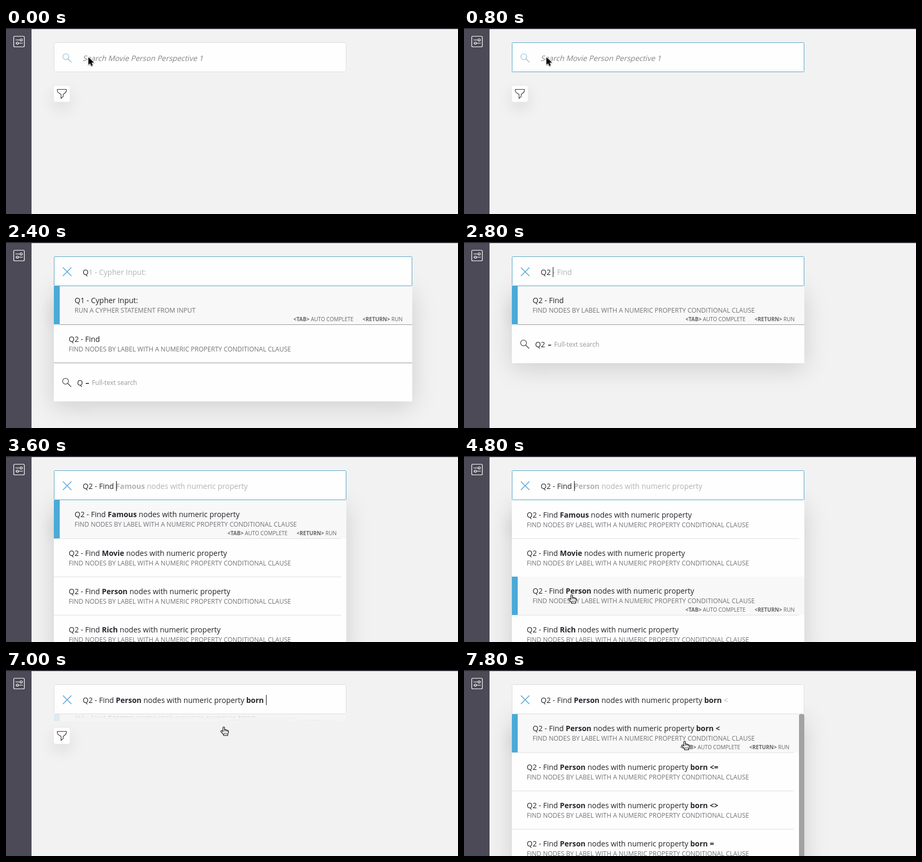
Animation, 850 px wide and 350 px high, one loop 8000 ms. Source, as an HTML page with a canvas:

```html
<!DOCTYPE html>
<html lang="en">
<head>
<meta charset="utf-8">
<title>Search suggestions</title>
<style>
  html, body { margin: 0; width: 100%; height: 100%; overflow: hidden; background: #f2f2f2; }
  canvas { display: block; }
</style>
</head>
<body>
<canvas id="stage" width="850" height="350"></canvas>
<script>
const ctx = document.getElementById('stage').getContext('2d');
const LOOP = 8000, TICK = 200;
const LEFT = 90, TOP = 83, ROW = 72;
const BLUE = '#49aad8', INK = '#25252c', GHOST = '#b3b3b6', PAPER = '#fefefe';
const FIND_HINT = 'FIND NODES BY LABEL WITH A NUMERIC PROPERTY CONDITIONAL CLAUSE';

const find = label => `Q2 - Find *${label}* nodes with numeric property`;
const labels = ['Famous', 'Movie', 'Person', 'Rich'];
const signs = ['<', '<=', '<>', '='];
const born = 'Q2 - Find *Person* nodes with numeric property *born';

const startRows = ['Q1 - Cypher Input:', 'Q2 - Find'];
const labelRows = labels.map(find);
const bornRows = [born + '*'];
const signRows = signs.map(s => `${born} ${s}*`);

// Each step changes only the values it names; the rest carry over.
const steps = [
  { t: 0, text: '', ghost: '', width: 550, focus: false, rows: [], open: 0, full: '', scroll: false },
  { t: 200, focus: true },
  { t: 1400, text: 'Q', ghost: '1 - Cypher Input:', width: 674 },
  { t: 1800, rows: startRows, full: 'Q', open: 0.093 },
  { t: 2000, open: 1 },
  { t: 2600, text: 'Q2 ', ghost: '- Find', width: 550, rows: ['Q2 - Find'], full: 'Q2', open: 0.3 },
  { t: 2800, open: 1 },
  { t: 3200, text: 'Q2 - Find ', ghost: 'label', rows: labelRows, full: '', open: 0.1 },
  { t: 3400, open: 1 },
  { t: 5000, text: 'Q2 - Find *Person* nodes with numeric property ', ghost: '*born*', focus: false, rows: bornRows, open: 0.18 },
  { t: 5200, open: 1 },
  { t: 6800, text: born + '* ', ghost: '', open: 0.5 },
  { t: 7000, open: 0.18 },
  { t: 7200, ghost: '<', rows: signRows, open: 0.25 },
  { t: 7400, open: 1, scroll: true }
];

// Pointer tip positions: time, x, y
const path = [
  [0, 155, 55], [3800, 155, 55], [4600, 201, 261], [6000, 201, 261],
  [6600, 408, 107], [7200, 408, 107], [7600, 413.5, 134], [8000, 413.5, 134]
];

function stateAt(t) {
  const s = { typed: 0 };
  for (const step of steps) {
    if (step.t > t) break;
    if ('text' in step) s.typed = step.t;
    Object.assign(s, step);
  }
  return s;
}

function pointerAt(t) {
  const i = path.findIndex(p => p[0] > t);
  const [t0, x0, y0] = path[i - 1], [t1, x1, y1] = path[i];
  const k = (t - t0) / (t1 - t0), e = k * k * (3 - 2 * k);
  return { x: x0 + (x1 - x0) * e, y: y0 + (y1 - y0) * e };
}

function rect(x, y, w, h, color) {
  ctx.fillStyle = color;
  ctx.fillRect(x, y, w, h);
}

function stroke(d, color, width = 1) {
  ctx.strokeStyle = color;
  ctx.lineWidth = width;
  ctx.stroke(new Path2D(d));
}

// Draws text with *bold* parts and returns its right end.
function write(text, x, y, size, color) {
  ctx.fillStyle = color;
  text.split('*').forEach((part, i) => {
    ctx.font = `${i % 2 ? 700 : 400} ${size}px "Open Sans", sans-serif`;
    ctx.fillText(part, x, y);
    x += ctx.measureText(part).width;
  });
  return x;
}

function shadow(alpha, blur, dy) {
  ctx.shadowColor = `rgba(0,0,0,${alpha})`;
  ctx.shadowBlur = blur;
  ctx.shadowOffsetY = dy;
}

function lens(x, y, color) {
  stroke(`M${x + 11} ${y + 6}a5.5 5.5 0 1 1-11 0a5.5 5.5 0 1 1 11 0M${x + 9.5} ${y + 10}l6.5 6.5`, color, 1.1);
}

function frame() {
  rect(0, 0, 850, 350, '#f2f2f2');
  rect(0, 0, 48, 350, '#4d4a57');
  rect(0, 0, 850, 2, '#2f2c37');
  stroke('M16.5 15.5h16a2 2 0 0 1 2 2v16a2 2 0 0 1-2 2h-16a2 2 0 0 1-2-2v-16a2 2 0 0 1 2-2z', '#fff', 1.2);
  stroke('M18 22.5h8.5m4 0h1m-1 0a2 2 0 1 1-4 0a2 2 0 1 1 4 0M18 28.5h1.5m4 0h8m-8 0a2 2 0 1 1-4 0a2 2 0 1 1 4 0', '#fff', 1.1);
}

function filterButton() {
  ctx.save();
  shadow(0.11, 30, 12);
  ctx.fillStyle = PAPER;
  ctx.beginPath();
  ctx.roundRect(90, 109, 30, 30, 4);
  ctx.fill();
  ctx.restore();
  stroke('M96.5 115.5h17v2.5q0 3-3.5 5l-2.5 2v4l-4 3.5v-7.5l-3-2q-4-2-4-5z', '#33333a', 1.1);
}

function inputBox(s, t) {
  rect(LEFT, 27, s.width, 56, PAPER);
  ctx.lineWidth = 1;
  ctx.strokeStyle = s.focus ? '#59a5c6' : '#dedee0';
  ctx.beginPath();
  ctx.roundRect(LEFT + 0.5, 27.5, s.width - 1, 55, 1);
  ctx.stroke();

  if (s.text) {
    stroke('M107 48l16 16M123 48l-16 16', '#5fa5d6', 1.6);
  } else {
    lens(107, 48, '#85bddb');
    ctx.save();
    ctx.transform(1, 0, -0.25, 1, 144, 62);
    write('Search Movie Person Perspective 1', 0, 0, 14, '#85858a');
    ctx.restore();
  }
  const end = write(s.text, 144.3, 62, 14, INK);
  write(s.ghost, end, 62, 14, GHOST);
  if (t >= TICK && (t - s.typed) % 1200 < 600) {
    rect(Math.round(end + 0.2), 47, 1, 19, '#111');
  }
}

function row(title, y, right, active) {
  const x = active ? 129 : 118, top = active ? y : y + 1;
  write(title, x, top + 32, 14, INK);
  write(title.startsWith('Q1') ? 'RUN A CYPHER STATEMENT FROM INPUT' : FIND_HINT, x, top + 50, 12, '#737378');
  if (!active) return;
  write('*<TAB>* AUTO COMPLETE', right - 223.5, y + 66, 10, '#66666b');
  write('*<RETURN>* RUN', right - 93.5, y + 66, 10, '#66666b');
}

function panel(s, chosen) {
  if (!s.open) return;
  const { width, rows } = s;
  const height = rows.length * ROW + (s.full ? 73 : 0);
  const right = LEFT + width - (s.scroll ? 10 : 0);
  ctx.save();
  ctx.globalAlpha = s.open < 1 ? 0.15 : 1;
  ctx.translate(0, TOP);
  ctx.scale(1, s.open);
  ctx.save();
  if (s.open === 1) shadow(0.15, 44, 10);
  rect(LEFT, 0, width, height, PAPER);
  ctx.restore();
  rows.forEach((title, i) => {
    const y = i * ROW, active = i === chosen;
    if (active) {
      rect(LEFT, y, width, ROW, '#f8f8f8');
      rect(LEFT, y, 11, ROW, BLUE);
    }
    if (s.full) rect(LEFT + (active ? 11 : 0), y + ROW, width - (active ? 11 : 0), 1, '#98989c');
    else if (rows.length > 1) rect(LEFT, y + ROW, right - LEFT - 10, 1, '#e0e0e2');
    row(title, y, right, active);
  });
  if (s.full) {
    const y = rows.length * ROW;
    lens(106.5, y + 29, '#33333a');
    const end = write(s.full, 133.7, y + 43, 14, INK);
    const dash = write('*–*', end + 5, y + 43, 14, INK);
    write('Full-text search', dash + 5, y + 42, 12, '#98989c');
  }
  if (s.scroll) {
    ctx.fillStyle = '#a2a2a4';
    ctx.beginPath();
    ctx.roundRect(630, 0, 10, height, 3);
    ctx.fill();
  }
  ctx.restore();
}

const arrow = new Path2D('M0 0v14l3.2-3 2.2 5.2 2.6-1.1-2.2-5h4.5z');
const hand = new Path2D('M0 1.5Q0 0 1.5 0T3 1.5V6q.5-1 1.6-.8 1 .2 1.1 1.1.6-.7 1.6-.4.9.3.9 1.2 1-.7 1.8.1.5.5.4 1.6 0 2.6-1.4 4.7V16H1v-2L-3.6 9.3q-.9-1.2.1-2 1-.6 2 .3L0 9z');

function pointer(p, isHand) {
  ctx.save();
  ctx.translate(p.x, p.y);
  shadow(0.3, 2, 1);
  ctx.lineJoin = 'round';
  if (isHand) {
    ctx.fillStyle = '#fff';
    ctx.fill(hand);
    ctx.shadowColor = 'transparent';
    ctx.strokeStyle = '#111';
    ctx.lineWidth = 1.2;
    ctx.stroke(hand);
    stroke('M3 6v3M5.7 6.5v2.7M8.3 7v2.5M2.5 11v3M4.7 11v3M7 11v3', '#111', 0.8);
  } else {
    ctx.strokeStyle = '#fff';
    ctx.lineWidth = 2;
    ctx.stroke(arrow);
    ctx.fillStyle = '#000';
    ctx.fill(arrow);
  }
  ctx.restore();
}

function draw(t) {
  const s = stateAt(t), p = pointerAt(t);
  const picking = t >= 3800 && t < 5000;
  const chosen = picking && p.y > TOP ? Math.floor((p.y - TOP) / ROW) : 0;
  if (s.ghost === 'label') s.ghost = `*${labels[chosen]}* nodes with numeric property`;
  frame();
  filterButton();
  panel(s, chosen);
  inputBox(s, t);
  const onRow = picking ? p.y > TOP : t >= 6400;
  if (t < 1400 || t >= 3800) pointer(p, onRow);
}

function tick(now) {
  draw(Math.floor(now % LOOP / TICK) * TICK);
  requestAnimationFrame(tick);
}
requestAnimationFrame(tick);
</script>
</body>
</html>
```
